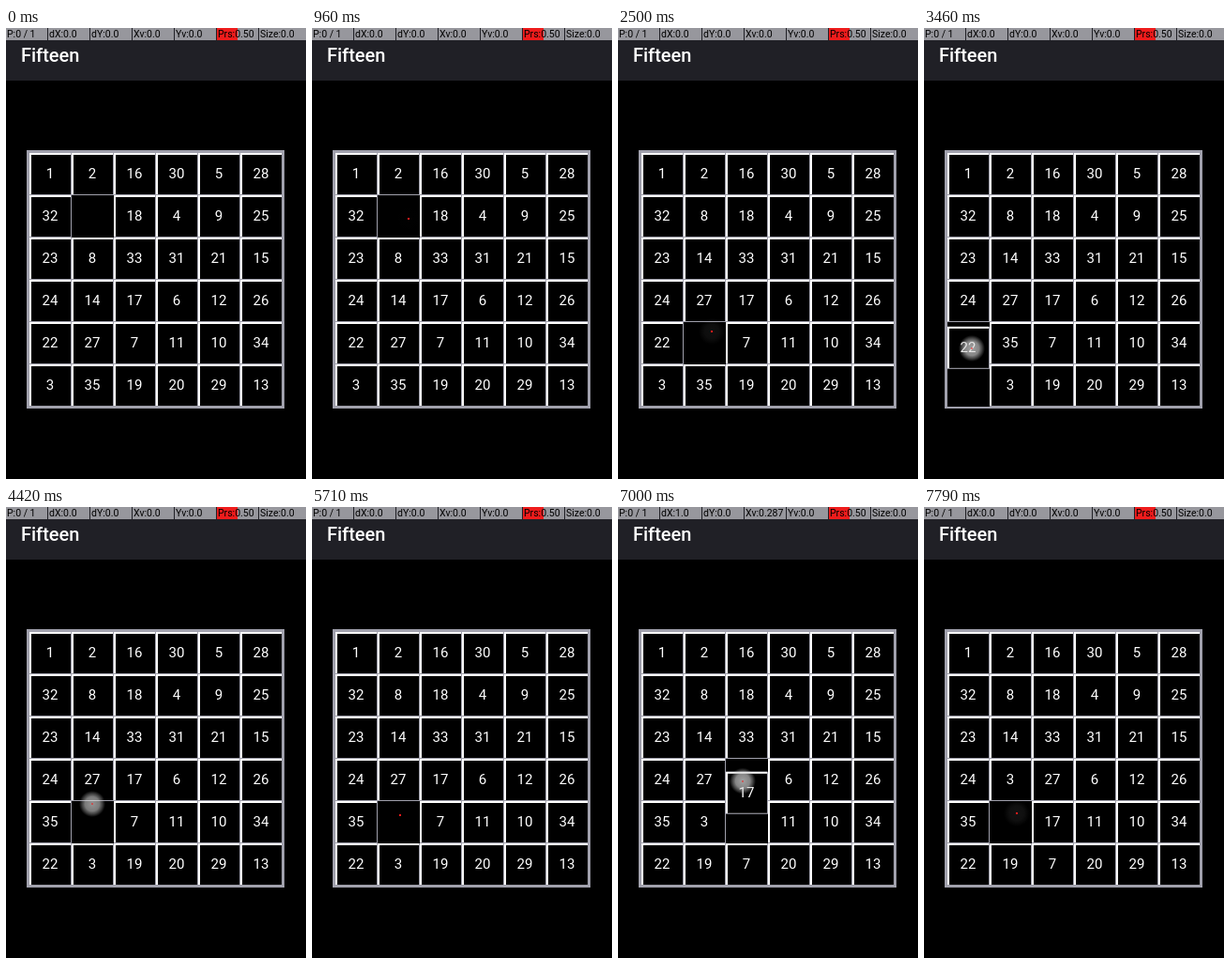
Animation, 320 px wide and 480 px high, one loop 8 s. Source, as an HTML page with a canvas:

```html
<!DOCTYPE html>
<html lang="en">
<head>
<meta charset="utf-8">
<title>Fifteen</title>
<style>
  html, body { margin: 0; width: 100%; height: 100%; overflow: hidden; background: #000; }
  canvas { display: block; }
</style>
</head>
<body>
<canvas id="stage" width="320" height="480"></canvas>
<script>
const ctx = document.getElementById('stage').getContext('2d');
const LOOP = 8000, CELL = 45, LEFT = 25, TOP = 133;
const PACE = 250;      // finger time per cell
const TRIGGER = .74;   // share of a cell crossed before its tile slides
const SLIDE = 150;     // tile animation time
const BRIGHT = '#fff', DIM = '#a0a0ac';

const START = `1 2 16 30 5 28
32 0 18 4 9 25
23 8 33 31 21 15
24 14 17 6 12 26
22 27 7 11 10 34
3 35 19 20 29 13`.split('\n').map(line => line.split(' ').map(Number));

const DIRECTIONS = { D: [1, 0], U: [-1, 0], L: [0, -1], R: [0, 1] };

// Each stroke leads the gap along its route, starting in column 1.
const STROKES = [
  { appear: 880, start: 1210, fade: 2275, row: 1, route: 'DDD', from: [103, 203], to: [100, 323] },
  { appear: 2744, start: 2744, fade: 4400, row: 4, route: 'DLUR', from: [100, 323], to: [92, 316] },
  { appear: 5200, start: 6010, fade: 7570, row: 4, route: 'DRUULD', from: [94, 328], to: [99, 326] }
];

const steps = [];
for (const stroke of STROKES) {
  let row = stroke.row, col = 1;
  stroke.path = [stroke.from];
  [...stroke.route].forEach((letter, i) => {
    row += DIRECTIONS[letter][0];
    col += DIRECTIONS[letter][1];
    // The finger swings a little less than a full cell sideways.
    stroke.path.push([51 + 41 * col, TOP + 22 + CELL * row]);
    steps.push({ time: stroke.start + (i + TRIGGER) * PACE, row, col });
  });
  stroke.path[stroke.path.length - 1] = stroke.to;
}

const clamp = (v, low, high) => Math.min(high, Math.max(low, v));
const mix = (a, b, k) => a + (b - a) * k;

function rect(color, x, y, w, h) {
  ctx.fillStyle = color;
  ctx.fillRect(x, y, w, h);
}

function label(text, x, y, font, color, align = 'left') {
  ctx.font = font + ' Roboto, sans-serif';
  ctx.fillStyle = color;
  ctx.textAlign = align;
  ctx.fillText(text, x, y);
}

function drawHeader(t) {
  const nudged = t >= 6960 && t < 7040;
  const items = [
    'P:0 / 1', nudged ? 'dX:1.0' : 'dX:0.0', 'dY:0.0',
    nudged ? 'Xv:0.287' : 'Xv:0.0', 'Yv:0.0', 'Prs:0.50', 'Size:0.0'
  ];
  rect('#202026', 0, 0, 320, 56);
  items.forEach((text, i) => {
    const x = i * CELL;
    rect('#97979d', x, 0, i < 6 ? CELL - 1 : 50, 13);
    if (text.startsWith('Prs')) rect('#ee1c1c', x, 0, 22, 13);
    label(text, x + 1, 10, '10.5px', '#000');
  });
  label('Fifteen', 16, 36, '500 20px', BRIGHT);
}

function drawTile(number, row, col) {
  const x = LEFT + col * CELL, y = TOP + row * CELL;
  rect(DIM, x, y, CELL, CELL);
  rect(BRIGHT, x, y, CELL - 1, CELL - 1);
  rect('#000', x + 2, y + 2, CELL - 3, CELL - 3);
  label(number, x + 22, y + 27, '15px', BRIGHT, 'center');
}

function drawBoard(t) {
  rect(DIM, LEFT - 3, TOP - 3, 275, 275);
  rect('#000', LEFT, TOP, 270, 270);

  const board = START.map(row => row.slice());
  let gap = { row: 1, col: 1 }, moving = null;
  for (const step of steps) {
    if (t < step.time) break;
    const number = board[step.row][step.col];
    const progress = (t - step.time) / SLIDE;
    board[step.row][step.col] = 0;
    if (progress < 1) {
      const eased = (1 - Math.cos(Math.PI * progress)) / 2;
      moving = [number, mix(step.row, gap.row, eased), mix(step.col, gap.col, eased)];
    } else {
      board[gap.row][gap.col] = number;
    }
    gap = step;
  }
  board.forEach((cells, row) => cells.forEach((number, col) => {
    if (number) drawTile(number, row, col);
  }));
  if (moving) drawTile(...moving);
}

function drawFinger(t) {
  const stroke = STROKES.filter(s => t >= s.appear).pop();
  if (!stroke) return;
  const { path, start, fade } = stroke;
  const place = clamp((t - start) / PACE, 0, path.length - 1);
  const leg = Math.min(Math.floor(place), path.length - 2);
  const [x, y] = [0, 1].map(i => mix(path[leg][i], path[leg + 1][i], place - leg));
  const glow = t < fade
    ? clamp((t - start + PACE) / 150, 0, 1)
    : clamp(1 - (t - fade) / 250, .1, 1);

  const spot = ctx.createRadialGradient(x, y, 0, x, y, 14);
  spot.addColorStop(0, 'rgba(225,225,225,.72)');
  spot.addColorStop(.55, 'rgba(215,215,215,.62)');
  spot.addColorStop(.78, 'rgba(190,190,190,.35)');
  spot.addColorStop(1, 'rgba(170,170,170,0)');
  ctx.globalAlpha = glow;
  rect(spot, x - 14, y - 14, 28, 28);
  ctx.globalAlpha = 1 - glow * .5;
  rect('#ee1c1c', Math.round(x) - 1, Math.round(y) - 1, 2, 2);
  ctx.globalAlpha = 1;
}

function draw() {
  const t = performance.now() % LOOP;
  rect('#000', 0, 0, 320, 480);
  drawHeader(t);
  drawBoard(t);
  drawFinger(t);
  requestAnimationFrame(draw);
}
draw();
</script>
</body>
</html>
```
